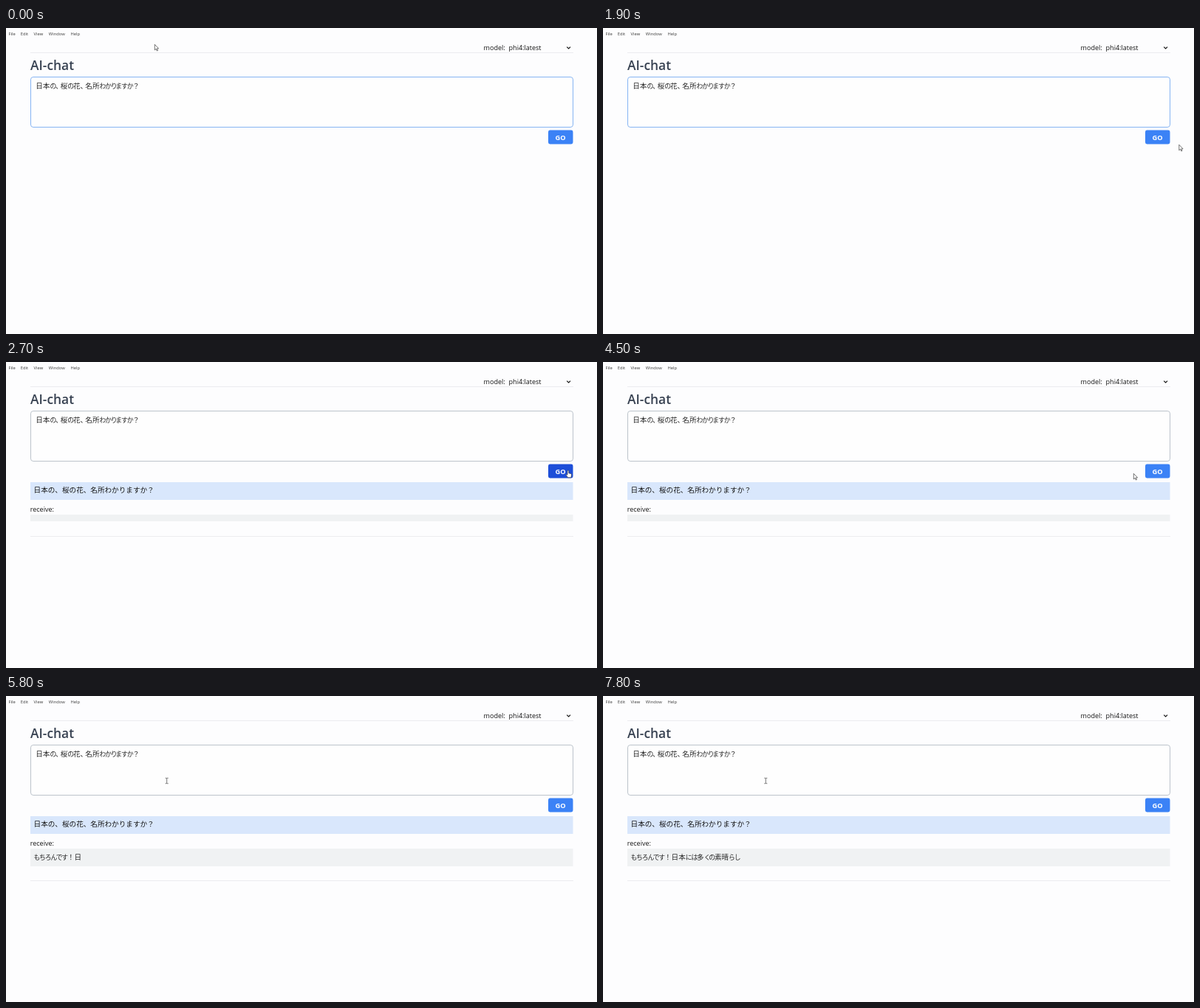
Animation, 800 px wide and 415 px high, one loop 8000 ms. Source, as an HTML page:

```html
<!DOCTYPE html>
<html lang="ja">
<head>
<meta charset="utf-8">
<title>AI-chat</title>
<style>
  html, body { margin: 0; width: 100%; height: 100%; overflow: hidden; background: #fdfdfe; }
  svg { display: block; width: 800px; height: 415px; }
  text { font: 9px "Open Sans", "Noto Sans", sans-serif; fill: #151515; white-space: pre; }
  .menu text { font-size: 5.8px; fill: #3c3c3c; }
  .title { font-size: 17.4px; font-weight: 600; fill: #374151; }
  .go { font-size: 9.3px; font-weight: 700; fill: #fff; text-anchor: middle; }
  .ja { font: 9.6px "Noto Sans CJK JP", "Noto Sans CJK", sans-serif; }
  .ui { fill: #262626; }
  /* compact kana, as in a proportional interface font */
  .kana { font-size: 8.8px; letter-spacing: -1.13px; }
  .slim { font-size: 8.8px; letter-spacing: -2.3px; }
  .comma { letter-spacing: -2.9px; }
  .rule { stroke: #ececef; }
  #box { fill: #fefefe; }
  .pointer { fill: #fff; stroke: #3a3a3a; stroke-width: .7; stroke-linejoin: round; }
</style>
</head>
<body>
<svg viewBox="0 0 800 415">
  <g class="menu">
    <text x="3.6" y="9.7">File</text>
    <text x="19.8" y="9.7">Edit</text>
    <text x="37.6" y="9.7">View</text>
    <text x="57.8" y="9.7">Window</text>
    <text x="87.6" y="9.7">Help</text>
  </g>

  <text x="646.6" y="30.3">model:</text>
  <text x="680.6" y="30.3">phi4:latest</text>
  <path d="M759.2 25.6l2.4 2.4 2.4-2.4" fill="none" stroke="#151515" stroke-width="1.2"/>
  <path class="rule" d="M33 33.5H768"/>
  <text class="title" x="33" y="57.4">AI-chat</text>

  <rect id="box" x="33.5" y="66.5" width="734" height="68" rx="3.4"/>
  <text id="prompt" class="ja ui" x="40.2" y="82.4"></text>

  <rect id="button" x="734" y="138.5" width="33.5" height="19" rx="2.4"/>
  <text class="go" x="750.6" y="152">GO</text>

  <g id="answer">
    <rect x="33" y="163" width="734.5" height="24" fill="#d9e7fc"/>
    <text id="sent" class="ja" x="37.6" y="177.4"></text>
    <text x="32.8" y="202.5">receive:</text>
    <rect id="panel" x="33" y="207" width="734.5" height="9" fill="#f0f2f3"/>
    <text id="reply" class="ja ui" x="37.4" y="222.3"></text>
    <path id="end" class="rule" d="M33 236.5H768"/>
  </g>

  <g id="arrow" class="pointer">
    <path d="M.3 .3v7.6l1.8-1.6 1.2 2.7 1.2-.5-1.2-2.6h2.3z"/>
  </g>
  <g id="beam" fill="none" stroke="#555" stroke-width=".8">
    <path d="M-2-3.7h1.5l.5.4.5-.4h1.5M0-3.4v6.8M-2 3.7h1.5l.5-.4.5.4h1.5"/>
  </g>
  <g id="hand" class="pointer">
    <path d="M-1 .8a.9.9 0 0 1 1.8 0v3l2.8.7q1 .3.9 1.4l-.6 3.8h-4.2l-2.7-3.5q.4-1.1 2-.1z"/>
  </g>
</svg>
<script>
const LOOP = 8000;
const HOVER = 2100, CLICK = 2300, SEND = 2700, LEAVE = 4500, REPLY = 4600;
const QUESTION = "日本の、桜の花、名所わかりますか？";

// [start, shape, x, y]
const pointer = [
  [0, "arrow", 201, 22],
  [500, "beam", 470, 100],
  [1000, "arrow", 640, 298],
  [1600, "arrow", 793, 284],
  [1900, "arrow", 779.5, 158],
  [HOVER, "hand", 764, 149],
  [2200, "hand", 761, 147],
  [LEAVE, "arrow", 718, 151],
  [REPLY, "beam", 217.7, 115],
  [6300, "beam", 220.3, 115]
];

// [start, streamed token]
const tokens = [
  [REPLY, "も"], [4900, "ち"], [5000, "ろ"], [5200, "ん"], [5400, "です"],
  [5600, "！"], [5800, "日"], [6000, "本"], [6200, "に"], [6300, "は"],
  [6500, "多"], [6700, "く"], [6900, "の"], [7300, "素"], [7500, "晴"],
  [7600, "ら"], [7800, "し"]
];

const $ = id => document.getElementById(id);
const set = (id, name, value) => $(id).setAttribute(name, value);
const show = (id, on) => set(id, "visibility", on ? "visible" : "hidden");

function kind(ch) {
  if (ch === "、") return "comma";
  if ("くしり".includes(ch)) return "slim";
  return /[ぁ-ん]/.test(ch) ? "kana" : "";
}

function compact(text) {
  return [...text].map(ch => `<tspan class="${kind(ch)}">${ch}</tspan>`).join("");
}

$("prompt").innerHTML = compact(QUESTION);
$("sent").textContent = QUESTION;

let lastReply = null;

function draw(now) {
  const t = now % LOOP;
  const [, shape, x, y] = pointer.filter(p => p[0] <= t).pop();
  for (const id of ["arrow", "beam", "hand"]) show(id, id === shape);
  set(shape, "transform", `translate(${x} ${y})`);

  set("box", "stroke", t < CLICK ? "#86b4f3" : "#bcc3cb");
  set("button", "fill", t >= HOVER && t < LEAVE ? "#1d4ed8" : "#3b82f6");
  show("answer", t >= SEND);

  const open = t >= REPLY;
  set("panel", "height", open ? 24 : 9);
  set("end", "d", `M33 ${open ? 250.5 : 236.5}H768`);

  const reply = tokens.filter(k => k[0] <= t).map(k => k[1]).join("");
  if (reply !== lastReply) {
    $("reply").innerHTML = compact(reply);
    lastReply = reply;
  }
}

const start = performance.now();
function tick() {
  draw(performance.now() - start);
  requestAnimationFrame(tick);
}
tick();
</script>
</body>
</html>
```
